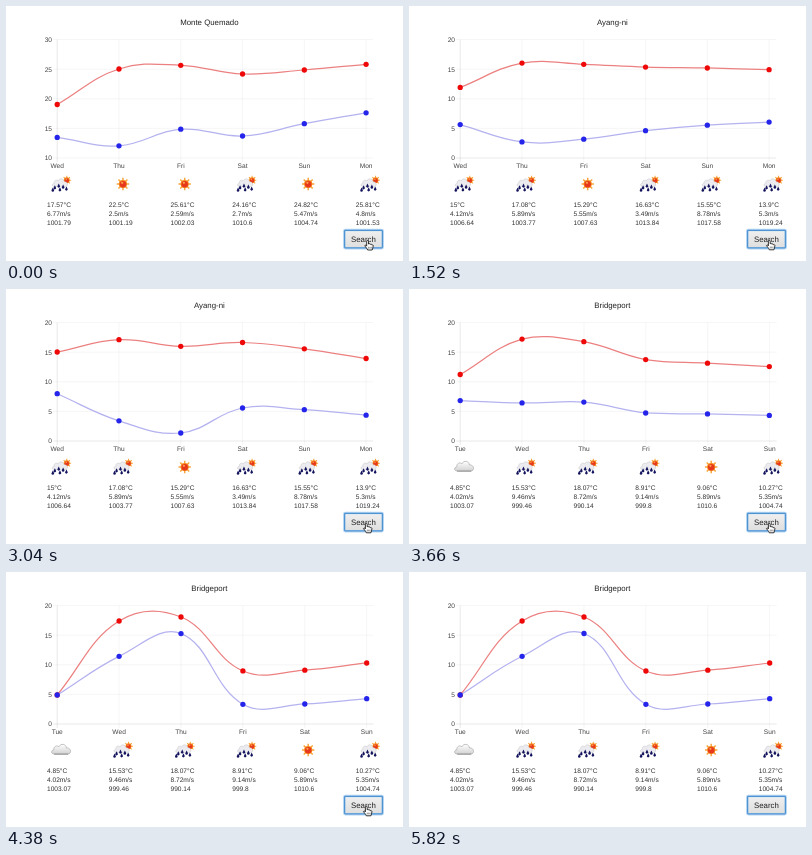
Write an HTML page that moves like this. It is 397 px wide and 255 px high and loops after 5.84 s.

```html
<!DOCTYPE html>
<html lang="en">
<head>
<meta charset="utf-8">
<title>Weather forecast</title>
<style>
  html, body { margin: 0; width: 100%; height: 100%; overflow: hidden; background: #fff; }
  svg { display: block; text-rendering: geometricPrecision; }
  text { font: 6.6px "Liberation Sans", Arial, sans-serif; fill: #444; }
  .data { fill: #333; }
  .title, .button { font-size: 7.85px; fill: #222; }
  .mid { text-anchor: middle; }
  .end { text-anchor: end; }
  .line { fill: none; stroke-width: 1.25; }
</style>
</head>
<body>
<svg id="stage" width="397" height="255" viewBox="0 0 397 255">
  <defs>
    <linearGradient id="face" x2="0" y2="1">
      <stop offset="0" stop-color="#f0f0f0"/><stop offset="1" stop-color="#dedede"/>
    </linearGradient>
    <linearGradient id="puff" x2="0" y2="1">
      <stop offset="0" stop-color="#fff"/><stop offset="1" stop-color="#d2d2d2"/>
    </linearGradient>
    <path id="cloudShape" d="M-7 4.6C-10.3 4.6-10.5.8-7.3.4C-8-3-4-4.6-2.3-2.6C-.6-6.4 5-5.6 5.2-1.4C10.2-2 10.6 4.6 6.8 4.6Z"/>
    <g id="sun">
      <path d="M0-6.2V6.2M-6.2 0H6.2M-4.5-4.5L4.5 4.5M-4.5 4.5L4.5-4.5" stroke="#f6a63c" stroke-width="1.5"/>
      <circle r="4.1" fill="#f58a1c"/>
      <circle r="3.2" cy=".3" fill="#e8381c"/>
      <circle r="1.1" cx="-.8" cy="-1.2" fill="#f9a048"/>
    </g>
    <g id="cloud">
      <use href="#cloudShape" y="-.6" fill="url(#puff)" stroke="#aaa" stroke-width=".7"/>
      <path d="M-7 4.2H7" stroke="#777" stroke-width=".7"/>
    </g>
    <g id="rain">
      <use href="#sun" transform="translate(5.6 -3.8) scale(.7)"/>
      <use href="#cloudShape" transform="translate(-1.2 -1.1) scale(.8)" fill="#ececf0" stroke="#bbb" stroke-width=".5"/>
      <g fill="#14145e">
        <path id="drop" d="M-6.4 1.2C-5.7 2.9-4.8 3.5-5.1 4.6C-5.5 5.7-7.4 5.7-7.7 4.6C-7.9 3.5-6.9 2.9-6.4 1.2Z"/>
        <use href="#drop" x="3.9" y="-1.8"/>
        <use href="#drop" x="5.1" y="2"/>
        <use href="#drop" x="8.3" y="-.6"/>
        <use href="#drop" x="11.6" y="1.2"/>
        <use href="#drop" x="-2" y="2.4"/>
      </g>
    </g>
  </defs>
  <g id="scenes"></g>
  <g id="chart"></g>
  <rect x="338.2" y="224" width="38.6" height="18.2" rx="1.2" fill="url(#face)" stroke="#b5d5f3" stroke-width="2.4"/>
  <rect x="338.6" y="224.4" width="37.8" height="17.4" rx=".8" fill="none" stroke="#4f94d2" stroke-width="1.2"/>
  <text class="button mid" x="357.4" y="235.8">Search</text>
  <g id="cursor">
    <path d="M-1 .8C-1-.4 .8-.4 .8 .8V3.4C1.5 2.8 2.4 3 2.5 3.8C3.2 3.3 4 3.6 4.1 4.4C4.9 4 5.6 4.5 5.5 5.4C5.5 7.2 4.7 7.8 4.5 9.4H-.1C-.4 8-1.7 7-2.7 5.5C-3.1 4.6-2.1 4.2-1.5 4.9L-1 5.5Z"
      fill="#fff" stroke="#111" stroke-width=".85" stroke-linejoin="round"/>
    <path d="M.9 6.2V8M2.3 6.2V8M3.6 6.2V8" stroke="#111" stroke-width=".45"/>
  </g>
</svg>
<script>
const LOOP = 5840, EASE_TIME = 1000;
const LEFT = 51.2, TOP = 33.6, BOTTOM = 152, TENSION = 0.4;

const scenes = [
  { start: 0, city: 'Monte Quemado', ticks: [30, 25, 20, 15, 10], right: 360.1,
    days: 'Wed Thu Fri Sat Sun Mon', icons: 'rain sun sun rain sun rain',
    temp: '17.57 22.5 25.61 24.16 24.82 25.81',
    wind: '6.77 2.5 2.59 2.7 5.47 4.8',
    pressure: '1001.79 1001.19 1002.03 1010.6 1004.74 1001.53',
    high: [98.5, 63, 59.3, 68, 64, 58.3],
    low: [131.4, 139.8, 123.2, 130, 117.7, 106.8] },
  { start: 1370, city: 'Ayang-ni', ticks: [20, 15, 10, 5, 0], right: 360.1,
    days: 'Wed Thu Fri Sat Sun Mon', icons: 'rain rain sun rain rain rain',
    temp: '15 17.08 15.29 16.63 15.55 13.9',
    wind: '4.12 5.89 5.55 3.49 8.78 5.3',
    pressure: '1006.64 1003.77 1007.63 1013.84 1017.58 1019.24',
    high: [63, 50.7, 57.3, 53.5, 59.8, 69.5],
    low: [104.7, 131.8, 144, 119, 120.7, 126.2] },
  { start: 3550, city: 'Bridgeport', ticks: [20, 15, 10, 5, 0], right: 360.7,
    days: 'Tue Wed Thu Fri Sat Sun', icons: 'cloud rain rain rain sun rain',
    temp: '4.85 15.53 18.07 8.91 9.06 10.27',
    wind: '4.02 9.46 8.72 9.14 5.89 5.35',
    pressure: '1003.07 999.46 990.14 999.8 1010.6 1004.74',
    high: [123, 49, 45, 99, 98.2, 91],
    low: [123, 84.3, 61.5, 132.3, 132, 126.7] }
];

// time, x, y of the pointer tip
const pointer = [[0, 361.7, 234.6], [500, 361.7, 234.6], [900, 360.4, 234.4],
  [4600, 360.4, 234.4], [4880, 355, 258], [LOOP, 355, 258]];

const byId = id => document.getElementById(id);
const lerp = (a, b, k) => a + (b - a) * k;
const clamp = (v, lo, hi) => Math.min(hi, Math.max(lo, v));

function add(parent, tag, attrs, text) {
  const el = document.createElementNS('http://www.w3.org/2000/svg', tag);
  for (const key in attrs) el.setAttribute(key, attrs[key]);
  if (text !== undefined) el.textContent = text;
  return parent.appendChild(el);
}

function buildScene(scene) {
  const g = add(byId('scenes'), 'g', {});
  const xAt = i => lerp(LEFT, scene.right, i / 5);
  const list = key => scene[key].split(' ');
  const rule = (d, dark) =>
    add(g, 'path', { d, stroke: '#000', 'stroke-opacity': dark ? 0.13 : 0.06, 'stroke-width': 0.7 });
  const label = (x, y, cls, text) => add(g, 'text', { x, y, class: cls }, text);

  label(203.4, 18.8, 'title mid', scene.city);
  scene.ticks.forEach((value, i) => {
    const y = lerp(TOP, BOTTOM, i / 4);
    rule(`M${LEFT - 4} ${y}H${scene.right + 7}`, value === 0);
    label(46, y + 2.4, 'end', value);
  });
  const temp = list('temp'), wind = list('wind'), pressure = list('pressure'), icons = list('icons');
  list('days').forEach((day, i) => {
    const x = xAt(i), col = 41 + 61.75 * i;
    rule(`M${x} ${TOP}V${BOTTOM + 4}`, i === 0);
    label(x, 162.4, 'mid', day);
    add(g, 'use', { href: '#' + icons[i], x: col + 14.2, y: 178 });
    label(col, 201, 'data', temp[i] + '°C');
    label(col, 209.9, 'data', wind[i] + 'm/s');
    label(col, 218.8, 'data', pressure[i]);
  });
  scene.group = g;
  scene.curves = [scene.high, scene.low].map(ys => spline(ys.map((y, i) => [xAt(i), y])));
}

// Each knot becomes [x, y, inX, inY, outX, outY].
function spline(pts) {
  const dist = (a, b) => Math.hypot(b[0] - a[0], b[1] - a[1]);
  return pts.map((p, i) => {
    const a = pts[i - 1] || p, b = pts[i + 1] || p;
    const d1 = dist(a, p), d2 = dist(p, b);
    const k1 = TENSION * d1 / (d1 + d2), k2 = TENSION * d2 / (d1 + d2);
    const dx = b[0] - a[0], dy = b[1] - a[1];
    return [...p, p[0] - k1 * dx, clamp(p[1] - k1 * dy, TOP, BOTTOM),
      p[0] + k2 * dx, clamp(p[1] + k2 * dy, TOP, BOTTOM)];
  });
}

function buildSeries(lineColor, dotColor) {
  const g = add(byId('chart'), 'g', {});
  return {
    line: add(g, 'path', { class: 'line', stroke: lineColor }),
    dots: Array.from({ length: 6 }, () => add(g, 'circle', { r: 2.65, fill: dotColor }))
  };
}

scenes.forEach(buildScene);
const series = [buildSeries('#ec8080', '#ee0808'), buildSeries('#b4b2ef', '#2424ea')];

function drawSeries({ line, dots }, knots) {
  line.setAttribute('d', knots.map((k, i) => i
    ? `C${knots[i - 1].slice(4)} ${k.slice(2, 4)} ${k.slice(0, 2)}`
    : `M${k.slice(0, 2)}`).join(''));
  knots.forEach((k, i) => {
    dots[i].setAttribute('cx', k[0]);
    dots[i].setAttribute('cy', k[1]);
  });
}

function drawPointer(t) {
  const i = pointer.findIndex(p => p[0] > t);
  const a = pointer[i - 1], b = pointer[i], k = (t - a[0]) / (b[0] - a[0]);
  byId('cursor').setAttribute('transform', `translate(${lerp(a[1], b[1], k)} ${lerp(a[2], b[2], k)})`);
}

function draw(t) {
  const n = scenes.filter(s => s.start <= t).length - 1;
  const now = scenes[n], before = scenes[Math.max(0, n - 1)];
  const k = 1 - (1 - clamp((t - now.start) / EASE_TIME, 0, 1)) ** 4;
  scenes.forEach(s => { s.group.style.display = s === now ? '' : 'none'; });
  series.forEach((s, c) => drawSeries(s, now.curves[c].map((knot, i) =>
    knot.map((v, j) => lerp(before.curves[c][i][j], v, k)))));
  drawPointer(t);
}

function tick() {
  draw(performance.now() % LOOP);
  requestAnimationFrame(tick);
}
tick();
</script>
</body>
</html>
```
